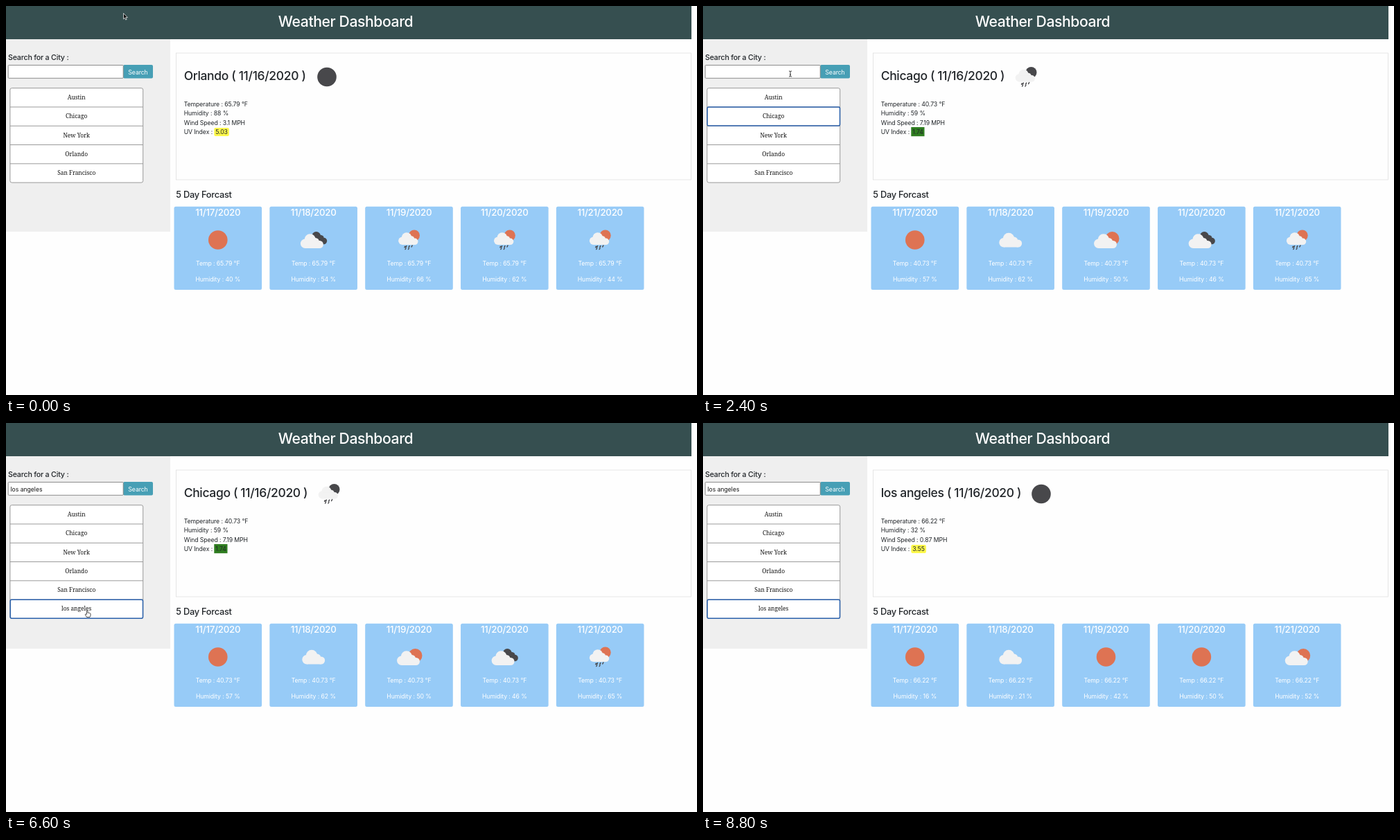
Animation of 997 by 562 pixels, one loop 9000 ms. Source, as an HTML page:

```html
<!DOCTYPE html>
<html lang="en">
<head>
<meta charset="utf-8">
<title>Weather Dashboard</title>
<style>
  html, body { margin: 0; width: 100%; height: 100%; overflow: hidden; background: #fefefe; }
  svg { display: block; width: 100vw; height: 100vh; }
  text { font-family: Inter, "Open Sans", sans-serif; fill: #212529; }
  .body { font-size: 8.7px; letter-spacing: -.01em; }
  .head { font-weight: 500; letter-spacing: -.02em; }
  .typed { font-size: 8.6px; fill: #111; }
  .item { font: 8.35px "Noto Serif", serif; fill: #111; }
  .white { fill: #fff; }
  .mid { text-anchor: middle; }
</style>
</head>
<body>
<svg id="stage" viewBox="0 0 997 562"></svg>
<script>
const stage = document.getElementById('stage');
const pen = document.createElement('canvas').getContext('2d');
const LIGHT = '#f2f2f2', DARK = '#48484b', SUN = '#de7353', BLUE = '#2c62ad';

const rect = (x, y, w, h, fill, extra = '') =>
  `<rect x="${x}" y="${y}" width="${w}" height="${h}" fill="${fill}" ${extra}/>`;
const text = (x, y, str, cls, size) =>
  `<text x="${x}" y="${y}" class="${cls}"${size ? ` style="font-size:${size}px"` : ''}>${str}</text>`;
const disc = (x, y, r, fill) => `<circle cx="${x}" cy="${y}" r="${r}" fill="${fill}"/>`;
const at = (x, y, content, scale = 1) =>
  `<g transform="translate(${x} ${y}) scale(${scale})">${content}</g>`;

// Weather icons, centred on 0,0
const cloud = disc(-9.7, 3.8, 6.7, LIGHT) + disc(-2.6, -2, 8.2, LIGHT) + disc(5, 1, 5.5, LIGHT) +
  disc(11, 5, 5.5, LIGHT) + rect(-9.7, 0, 20.7, 10.5, LIGHT);
const darkCloud = disc(4, -5.5, 6.5, DARK) + disc(10.5, -2.5, 4.6, DARK) +
  disc(14.7, 1.5, 4.8, DARK) + rect(2, -3, 12.7, 9.3, DARK);
const drops = `<path d="M-3.7 8.6l-1 2M.6 8.6l-1 2M4.6 8l-1 2M-5.8 9.4l-.6 1.4M-4.6 12l-.8 1.5M-.2 12l-.8 1.5"
  stroke="${DARK}" stroke-width="1.5" stroke-linecap="round"/>`;
const rain = orb => disc(7.5, -6.5, 8, orb) + at(-1.2, -2, cloud, .86) + drops;
const icons = {
  sun: disc(0, 0, 13.8, SUN),
  moon: disc(0, 0, 13.8, DARK),
  cloud,
  broken: darkCloud + at(-2.3, 1.5, cloud),
  few: disc(9, -2, 10, SUN) + at(-1, 1.5, cloud),
  rain: rain(SUN),
  nightRain: rain(DARK)
};

const cities = {
  orlando: { name: 'Orlando', icon: 'moon', iconX: 463, temp: 65.79, hum: 88, wind: 3.1, uv: '5.03',
    days: [['sun', 40], ['broken', 54], ['rain', 66], ['rain', 62], ['rain', 44]] },
  chicago: { name: 'Chicago', icon: 'nightRain', iconX: 466, temp: 40.73, hum: 59, wind: 7.19, uv: '1.74',
    days: [['sun', 57], ['cloud', 62], ['few', 50], ['broken', 46], ['rain', 65]] },
  la: { name: 'los angeles', icon: 'moon', iconX: 488, temp: 66.22, hum: 32, wind: 0.87, uv: '3.55',
    days: [['sun', 16], ['cloud', 21], ['sun', 42], ['sun', 50], ['few', 52]] }
};

const pointers = {
  arrow: `<path d="M0 0V8.3L1.9 6.6 3.2 9.5 4.6 8.9 3.3 6.1H5.9Z" fill="#111" stroke="#fff" stroke-width=".7"/>`,
  beam: `<path d="M-2-4Q0-4 0-3Q0-4 2-4M0-3V3M-2 4Q0 4 0 3Q0 4 2 4M-1 1H1" fill="none" stroke="#222" stroke-width=".9"/>`,
  hand: `<path d="M-1.6 1V-4.2Q-1.6-5.2-.8-5.2T0-4.2V-1.3Q1-2 1.7-1Q2.6-1.5 3-.5Q4-.7 4 .5V2.5L3 5H-1.5L-3.6 1.7Q-4 .6-3 .4Z"
    fill="#fff" stroke="#222" stroke-width=".8" stroke-linejoin="round"/>`
};

// Each track lists [start ms, value...]; the latest started entry applies
const shown = [[0, 'orlando'], [1000], [1400, 'orlando'], [2000], [2200, 'chicago'], [6800], [7200, 'la']];
const focus = [[0], [2000, 1], [2800, 'input'], [6600, 5]];
const typing = [[0, ''], [3800, 'l'], [4000, 'lo'], [4200, 'los'], [4400, 'los an'],
  [4600, 'los ange'], [4800, 'los angele'], [5400, 'los angeles']];
const pointer = [
  [0, 'arrow', 169.5, 10.5], [200, 'arrow', 709.5, 340], [400],
  [1600, 'arrow', 118, 32], [1800, 'hand', 112, 124], [2000, 'hand', 110, 160],
  [2400, 'beam', 126, 98], [2600, 'beam', 121, 96], [2800, 'beam', 119, 96],
  [3000, 'beam', 160, 99], [3200, 'arrow', 197, 125], [3600],
  [5800, 'arrow', 150, 297], [6000, 'arrow', 134, 285], [6200, 'hand', 122, 278], [6400, 'hand', 118, 275.5],
  [7600, 'hand', 152, 262], [7800, 'hand', 184, 236], [8000, 'arrow', 214, 206],
  [8200, 'arrow', 232, 185], [8600, 'arrow', 236, 109.5], [8800]
];
const pick = (track, t) => track.findLast(e => e[0] <= t).slice(1);

function sidebar(t) {
  const [active] = pick(focus, t), [typed] = pick(typing, t);
  const names = ['Austin', 'Chicago', 'New York', 'Orlando', 'San Francisco'];
  if (t >= 5600) names.push('los angeles');
  const step = 27.3, top = 118.6, inInput = active === 'input';
  const ring = `stroke="${BLUE}" stroke-width="1.5"`;

  let out = rect(0, 48, 237, 278, '#efefef') + text(3, 78, 'Search for a City :', 'head', 10.7);
  out += rect(169, 85, 43, 19.6, '#479fb5', 'rx="2"') + text(190.5, 99.3, 'Search', 'body white mid');
  out += rect(3.2, 85.5, 166, 18.8, '#fff', inInput ? ring + ' rx="1"' : 'stroke="#808080" stroke-width=".9" rx="1"');
  out += text(6.5, 98.7, typed, 'typed');
  if (inInput) {
    pen.font = '8.6px Inter, "Open Sans", sans-serif';
    out += rect(6.8 + pen.measureText(typed).width, 90.5, .8, 10, '#111');
  }
  out += rect(5.9, top, 191.8, step * names.length, '#fff', 'rx="2.5" stroke="#8f8f8f" stroke-width=".9"');
  names.forEach((name, i) => {
    const y = top + i * step;
    if (i) out += rect(5.9, y - .4, 191.8, .9, '#8f8f8f');
    out += text(101.7, y + 16.3, name, 'item mid');
  });
  if (Number.isInteger(active)) out += rect(6.2, top + active * step + .2, 191.3, step - .4, 'none', ring + ' rx="2"');
  return out;
}

function report(c) {
  let out = text(256.7, 107, `${c.name} ( 11/16/2020 )`, 'head', 17.5) + at(c.iconX, 102.5, icons[c.icon]);
  const lines = [`Temperature : ${c.temp} °F`, `Humidity : ${c.hum} %`, `Wind Speed : ${c.wind} MPH`, 'UV Index :'];
  lines.forEach((line, i) => out += text(256.7, 144.8 + i * 13.4, line, 'body'));
  out += c.uv < 3 ? rect(300.3, 175, 19.2, 13.2, '#2f7d20') : rect(300.3, 176, 21.6, 12, '#fdf84b', 'rx="2"');
  out += text(c.uv < 3 ? 310 : 311, 185, c.uv, 'body mid');
  out += text(245.3, 276.7, '5 Day Forcast', 'head', 12.8);
  c.days.forEach(([icon, hum], i) => {
    const x = 242.5 + i * 137.85, mid = x + 63.3;
    out += rect(x, 289.7, 126.6, 120.3, '#97cbf7', 'rx="2.5"') +
      text(mid, 302.6, `11/${17 + i}/2020`, 'head white mid', 13.3) + at(mid, 338, icons[icon]) +
      text(mid, 375.4, `Temp : ${c.temp} °F`, 'body white mid') +
      text(mid, 397.8, `Humidity : ${hum} %`, 'body white mid');
  });
  return out;
}

function scene(t) {
  const [city] = pick(shown, t), [kind, x, y] = pick(pointer, t);
  let out = rect(0, 0, 997, 562, '#fefefe') + rect(0, 0, 989, 48, '#364f50') +
    text(490, 30, 'Weather Dashboard', 'head white mid', 21.2) + sidebar(t) +
    rect(245.5, 68, 743, 183, 'none', 'stroke="#dfdfdf" stroke-width=".8"');
  if (city) out += report(cities[city]);
  if (t >= 1000 && t < 1400) {
    out += rect(-3, 550, 335, 15, '#36393b', 'rx="2"') +
      `<text x="2.7" y="558.6" style="font-size:6.6px;fill:#d4d4d4">Waiting for api.openweathermap.org…</text>`;
  }
  if (kind) out += at(x, y, pointers[kind]);
  return out;
}

const start = performance.now();
let last = -1;
function tick() {
  const t = Math.floor((performance.now() - start) % 9000 / 200) * 200;
  if (t !== last) stage.innerHTML = scene(last = t);
  requestAnimationFrame(tick);
}
tick();
</script>
</body>
</html>
```
